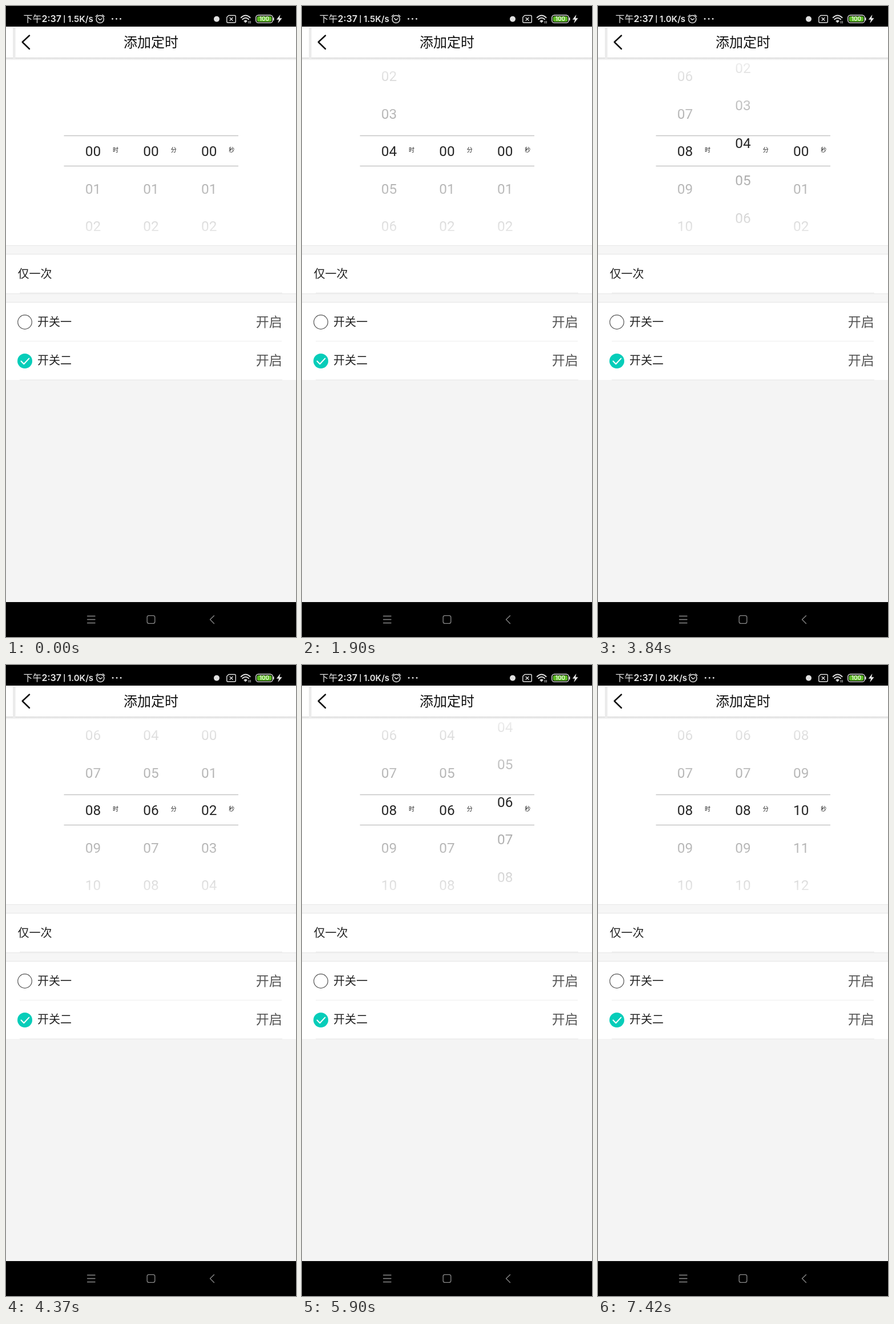
Animation of 508x1102 px, one loop 8000 ms. Source, as an HTML page:

```html
<!DOCTYPE html>
<html lang="zh-CN">
<head>
<meta charset="utf-8">
<title>添加定时</title>
<style>
  html, body { margin: 0; width: 100%; height: 100%; overflow: hidden; background: #f4f4f4; }
  svg { display: block; width: 100vw; height: 100vh; }
  text { font-family: "Noto Sans CJK SC", "Noto Sans CJK", "Noto Sans", sans-serif; fill: #222; }
  .status { font: 600 16px Inter, sans-serif; fill: #e8e8e8; }
  .status.cjk { font: 500 16px "Noto Sans CJK SC", "Noto Sans CJK", sans-serif; }
  .speed { font-size: 15px; }
  .charge { font: 600 10px Inter, sans-serif; fill: #eef8e6; }
  .title { font-size: 24px; fill: #111; }
  .unit { font-size: 10px; }
  .label { font-size: 20px; }
  .state { font-size: 23px; fill: #555; }
  .wheels text { font: 24.4px Roboto, sans-serif; text-anchor: middle; fill: #919191; }
  .wheels.picked text { fill: #262626; }
  .line { fill: none; stroke-linecap: round; stroke-linejoin: round; }
</style>
</head>
<body>
<svg viewBox="0 0 508 1102" preserveAspectRatio="none">
  <defs>
    <clipPath id="outside"><path d="M0 95H508V226.5H0ZM0 279.5H508V411H0Z"/></clipPath>
    <clipPath id="inside"><path d="M0 226.5H508V279.5H0Z"/></clipPath>
    <linearGradient id="fade" x1="0" y1="0" x2="0" y2="1">
      <stop offset="0" stop-color="#fff" stop-opacity=".9"/>
      <stop offset=".5" stop-color="#fff" stop-opacity="0"/>
      <stop offset="1" stop-color="#fff" stop-opacity=".9"/>
    </linearGradient>
    <linearGradient id="shadow" x1="0" y1="0" x2="0" y2="1">
      <stop offset="0" stop-color="#d9d9d9"/>
      <stop offset="1" stop-color="#fff"/>
    </linearGradient>
  </defs>

  <!-- panels -->
  <rect width="508" height="1102" fill="#f4f4f4"/>
  <rect y="36" width="508" height="617" fill="#fff"/>
  <rect y="418" width="508" height="15.5" fill="#f6f6f6"/>
  <rect y="502" width="508" height="15.5" fill="#f6f6f6"/>
  <path d="M0 418.3H508M0 433.5H508M0 502.5H508M0 517.4H508" stroke="#e6e6e6"/>
  <path d="M24 501H484M24 653H484" stroke="#e6e6e6"/>
  <path d="M24 585.3H483" stroke="#ededed"/>

  <!-- time picker -->
  <g class="wheels" clip-path="url(#outside)"></g>
  <rect x="100" y="89" width="308" height="328" fill="url(#fade)"/>
  <g class="wheels picked" clip-path="url(#inside)"></g>
  <path d="M101.5 226.5H407M101.5 279.5H407" stroke="#c6c6c6" stroke-width="1.3"/>
  <text class="unit" x="187" y="254.5">时</text>
  <text class="unit" x="288.7" y="254.5">分</text>
  <text class="unit" x="390.3" y="254.5">秒</text>

  <!-- header -->
  <rect y="90" width="508" height="5" fill="url(#shadow)"/>
  <rect x="12" y="38" width="4.5" height="54" fill="#ebebeb"/>
  <path class="line" d="M41 51.5L28.7 63L41 75" stroke="#111" stroke-width="2.5"/>
  <text class="title" x="206" y="72.3">添加定时</text>

  <!-- settings -->
  <text class="label" x="20.5" y="474.7">仅一次</text>
  <text class="label" x="55" y="558.7">开关一</text>
  <text class="label" x="55" y="626.4">开关二</text>
  <text class="state" x="437.7" y="559.7">开启</text>
  <text class="state" x="437.7" y="627.4">开启</text>
  <circle cx="33" cy="552" r="12.3" fill="#fff" stroke="#555" stroke-width="1.2"/>
  <circle cx="33" cy="620" r="13" fill="#06cdb9"/>
  <path class="line" d="M26.5 620.3L31.3 625.2L40.3 615.6" stroke="#fff" stroke-width="2"/>

  <!-- status bar -->
  <rect width="508" height="36"/>
  <text class="status cjk" x="30.5" y="28.3">下午</text>
  <text class="status" x="62.5" y="28.3">2:37</text>
  <path d="M102.3 16V29.5" stroke="#e0e0e0" stroke-width="1.5"/>
  <text class="status speed" id="speed" x="108" y="28"></text>
  <g id="alerts">
    <g class="line" stroke="#e0e0e0" stroke-width="1.5">
      <circle cx="164.7" cy="23" r="6.6"/>
      <path d="M157.3 18.3L160.3 15.5M172 18.3L169 15.5M161.8 21.6L164.5 24.4L168 22"/>
    </g>
    <g fill="#e0e0e0">
      <circle cx="186.5" cy="22.5" r="1.4"/>
      <circle cx="193.5" cy="22.5" r="1.4"/>
      <circle cx="200.5" cy="22.5" r="1.4"/>
    </g>
  </g>
  <circle cx="369" cy="22.7" r="5" fill="#e0e0e0"/>
  <g class="line" stroke="#e0e0e0" stroke-width="1.4">
    <path d="M390 16.5H400.5Q402.3 16.5 402.3 18.3V27.2Q402.3 29 400.5 29H388.6Q386.8 29 386.8 27.2V19.7Z"/>
    <path d="M392.2 20.4L397 25.2M397 20.4L392.2 25.2"/>
    <path d="M411.8 20.2Q419.7 12.8 427.6 20.2M414.3 23.2Q419.7 18.2 425.1 23.2" stroke-width="2"/>
    <path d="M417 26.1Q419.7 23.8 422.4 26.1L419.7 28.8Z" fill="#e0e0e0" stroke-width="1"/>
    <path d="M425.6 26.5V30M428.2 26.5V30" stroke-width="1"/>
    <rect x="437.7" y="16" width="29.6" height="13.4" rx="4.6"/>
  </g>
  <rect x="439.6" y="17.9" width="25.8" height="9.6" rx="3" fill="#5dba25"/>
  <text class="charge" x="452.5" y="26.4" text-anchor="middle">100</text>
  <path d="M468.8 20.2V25.2" stroke="#e0e0e0" stroke-width="1.5"/>
  <path d="M480.5 15L473.8 23.8H478L476.4 30.3L483.6 21.3H479.2Z" fill="#e8e8e8"/>

  <!-- navigation bar -->
  <rect y="1041" width="508" height="61"/>
  <g class="line" stroke="#8a8a8a" stroke-width="1.3">
    <path d="M142.5 1065.5H156M142.5 1071.5H156M142.5 1077.5H156"/>
    <rect x="247.2" y="1064.7" width="13.6" height="13.6" rx="3"/>
    <path d="M364.5 1064.7L357.5 1071.5L364.5 1078.5"/>
  </g>
</svg>
<script>
  const LOOP = 8000, TICK = 1000 / 24, ROW = 65.5, BASELINE = 262.2;
  const COLUMNS = [152.4, 254, 355.7];

  // [start ms, column, rows moved, pictures in the swipe]
  const SWIPES = [
    [1610, 0, 4, 8], [2310, 0, 2, 3], [2680, 0, 2, 3],
    [3090, 1, 2, 4], [3510, 1, 2, 4], [3840, 1, 2, 4],
    [4290, 2, 2, 3], [4660, 2, 2, 4], [4990, 2, 2, 4],
    [5900, 2, 2, 3], [6640, 1, 2, 4], [7300, 2, 2, 4]
  ];

  // [start ms, network speed, shift of the icons after it]
  const SPEEDS = [[0, "1.5K/s", 0], [2850, "1.0K/s", 0.6], [6850, "0.2K/s", 1.8]];

  const speed = document.getElementById("speed");
  const alerts = document.getElementById("alerts");

  function svg(name, parent, attrs = {}) {
    const node = document.createElementNS("http://www.w3.org/2000/svg", name);
    for (const key in attrs) node.setAttribute(key, attrs[key]);
    return parent.appendChild(node);
  }

  const wheels = [...document.querySelectorAll(".wheels")].map(layer =>
    COLUMNS.map(x => {
      const wheel = svg("g", layer);
      for (let n = 0; n < 14; n++) {
        svg("text", wheel, { x, y: BASELINE + n * ROW }).textContent = String(n).padStart(2, "0");
      }
      return wheel;
    }));

  function progress(elapsed, count) {
    if (elapsed < 0) return 0;
    const u = Math.min(1, Math.floor((elapsed + 8) / TICK) / (count - 1));
    return 0.11 + 0.89 * (1 - (1 - u) ** 2);
  }

  function draw(now) {
    const t = now % LOOP;
    const values = [0, 0, 0];
    for (const [start, column, rows, count] of SWIPES) {
      values[column] += rows * progress(t - start, count);
    }
    for (const layer of wheels) {
      layer.forEach((wheel, i) => wheel.setAttribute("transform", `translate(0 ${-values[i] * ROW})`));
    }
    const [, label, shift] = SPEEDS.filter(([start]) => t >= start).pop();
    if (speed.textContent !== label) speed.textContent = label;
    alerts.setAttribute("transform", `translate(${shift} 0)`);
  }

  function loop() {
    draw(performance.now());
    requestAnimationFrame(loop);
  }
  loop();
</script>
</body>
</html>
```
